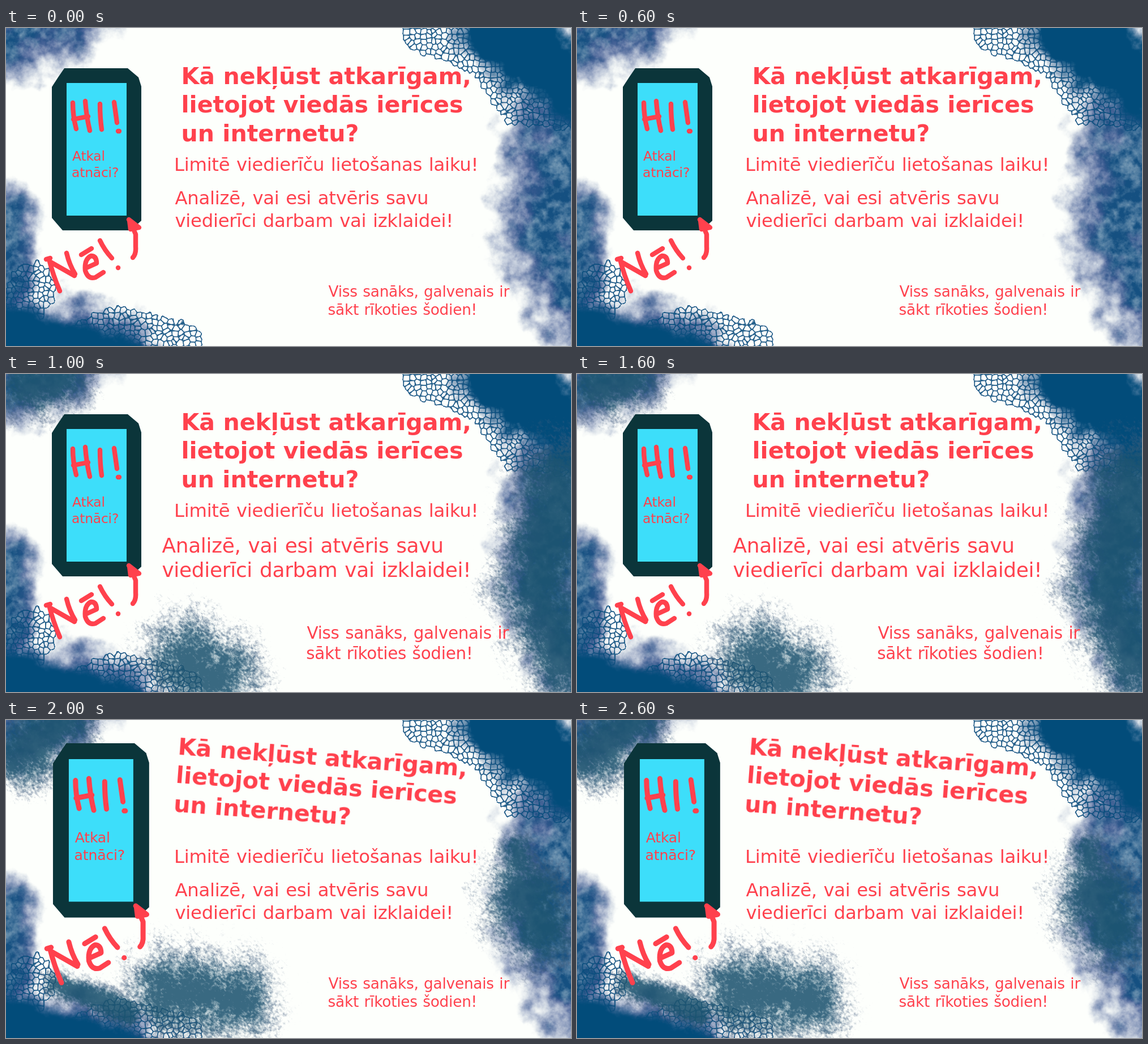
Write an HTML page with a canvas that moves like this. It is 998x561 px and loops after 3 s.

```html
<!DOCTYPE html>
<html lang="lv">
<head>
<meta charset="utf-8">
<title>Viedierīces</title>
<style>
html, body { margin: 0; width: 100%; height: 100%; overflow: hidden; background: #fdfffc; }
canvas, svg { position: absolute; left: 0; top: 0; width: 100%; height: 100%; }
text { font-family: "DejaVu Sans", sans-serif; fill: #ff414d; letter-spacing: -.008em; word-spacing: .05em; }
#title text { font-size: 41.1px; font-weight: bold; letter-spacing: 0; word-spacing: 0; }
.body { font-size: 32.3px; }
.note { font-size: 26.3px; }
.small { font-size: 23.4px; }
.pen { fill: none; stroke: #ff414d; stroke-width: 8.4; stroke-linecap: round; stroke-linejoin: round; }
#second, #third, #title, #phone, #advice, #closing { animation: 3s step-end infinite; }
#second { animation-name: second; }
#third { animation-name: third; }
#title { animation-name: tilt; }
#phone { animation-name: grow; }
#advice { animation-name: advice; }
#closing { animation-name: closing; }
@keyframes second { 0%, 66.6667% { visibility: hidden; } 33.3333% { visibility: visible; } }
@keyframes third { 0% { visibility: hidden; } 66.6667% { visibility: visible; } }
@keyframes tilt {
  0% { transform: none; }
  66.6667% { transform: translate(305.5px, 60.5px) rotate(4.3deg) translate(-312px, -98.5px); }
}
@keyframes grow {
  0% { transform: none; }
  66.6667% { transform: translate(-4.1px, -35.3px) scale(1.075); }
}
@keyframes advice {
  0%, 66.6667% { transform: none; }
  33.3333% { transform: translate(-56.2px, -31px) scale(1.111); }
}
@keyframes closing {
  0%, 66.6667% { transform: none; }
  33.3333% { transform: translate(-104.7px, -61.9px) scale(1.117); }
}
</style>
</head>
<body>
<canvas id="first" width="998" height="561"></canvas>
<canvas id="second" width="998" height="561"></canvas>
<canvas id="third" width="998" height="561"></canvas>
<svg viewBox="0 0 998 561">
  <g id="phone">
    <path fill="#0b353a" d="M103 71H215L234 87L239 103V340L220 357H100L81 335V104L92 87Z"/>
    <path fill="#3ddefa" d="M107 97H213V331H107Z"/>
    <path class="pen" d="M118 132Q118 155 124 178M140 129Q142 156 148 181M119 161L145 156M166 134Q166 158 169 179M191 131L196 167M198 182h2"/>
    <text class="small" x="117" y="234">Atkal</text>
    <text class="small" x="116" y="263">atnāci?</text>
    <path class="pen" d="M71 408L78 406M76 408Q83 436 95 464M77 412L121 437M107 397Q112 418 122 434
      M133 400L151 389M140 424L160 415Q160 402 150 402Q138 408 140 428Q145 444 158 440L172 431
      M166 375Q174 392 187 406M198 423h.1M224 405Q230 399 229 386V364L219 340M217 338L235 352L220 355L218 339"/>
  </g>
  <g id="title">
    <text x="309.5" y="98.5">Kā nekļūst atkarīgam,</text>
    <text x="309.5" y="149.3">lietojot viedās ierīces</text>
    <text x="309.5" y="200">un internetu?</text>
  </g>
  <text class="body" x="297" y="251.5">Limitē viedierīču lietošanas laiku!</text>
  <g id="advice" class="body">
    <text x="298.5" y="311">Analizē, vai esi atvēris savu</text>
    <text x="298.5" y="350.5">viedierīci darbam vai izklaidei!</text>
  </g>
  <g id="closing" class="note">
    <text x="569.5" y="473.5">Viss sanāks, galvenais ir</text>
    <text x="568.5" y="505.5">sākt rīkoties šodien!</text>
  </g>
</svg>
<script>
const W = 998, H = 561;

const mix = (a, b, t) => a + (b - a) * t;
const clamp = t => Math.min(1, Math.max(0, t));

function smooth(lo, hi, v) {
  const t = clamp((v - lo) / (hi - lo));
  return t * t * (3 - 2 * t);
}

function hash(x, y) {
  let h = Math.imul(x, 374761393) ^ Math.imul(y, 668265263);
  h = Math.imul(h ^ h >>> 13, 1274126177);
  return ((h ^ h >>> 16) >>> 0) / 2 ** 32;
}

function noise(x, y) {
  const i = Math.floor(x), j = Math.floor(y);
  const u = smooth(0, 1, x - i), v = smooth(0, 1, y - j);
  return mix(mix(hash(i, j), hash(i + 1, j), u), mix(hash(i, j + 1), hash(i + 1, j + 1), u), v);
}

function fbm(x, y, octaves) {
  let sum = 0, amp = 1, total = 0;
  for (let k = 0; k < octaves; k++) {
    sum += amp * noise(x, y);
    total += amp;
    amp *= .55;
    [x, y] = [1.6 * x - 1.2 * y + 17, 1.2 * x + 1.6 * y + 31];
  }
  return sum / total;
}

// Brush stroke through key points: 1 on the line, 0 at the given radius, negative beyond
function brush(radius, ...pts) {
  return (x, y) => {
    let least = Infinity;
    for (let k = 1; k < pts.length; k++) {
      const [ax, ay] = pts[k - 1], dx = pts[k][0] - ax, dy = pts[k][1] - ay;
      const t = clamp(((x - ax) * dx + (y - ay) * dy) / (dx * dx + dy * dy));
      least = Math.min(least, Math.hypot(x - ax - t * dx, y - ay - t * dy));
    }
    return 1 - least / radius;
  };
}

const union = (...fields) => (x, y) => fields.reduce((top, f) => Math.max(top, f(x, y)), -9);

const clouds = union(
  brush(95, [0, 15], [110, -25]),
  brush(120, [985, 170], [960, 370], [1020, 470]),
  brush(65, [0, 330], [5, 470]),
  brush(100, [10, 535], [190, 575])
);
const deeps = union(
  brush(88, [860, -10], [990, 90]),
  brush(85, [0, 545], [190, 600])
);
const foams = union(
  brush(38, [735, 8], [800, 32], [860, 60], [905, 135], [998, 145]),
  brush(45, [45, 455], [20, 510]),
  brush(38, [120, 555], [200, 527], [310, 557])
);
const splatsA = union(
  brush(80, [40, 20], [90, 10]),
  brush(110, [975, 190], [935, 385], [1000, 520]),
  brush(115, [325, 505], [370, 530])
);
const splatsB = union(
  brush(88, [95, 0], [30, 60]),
  brush(105, [910, 310], [945, 370]),
  brush(50, [900, 230], [905, 250]),
  brush(110, [290, 480], [405, 490]),
  brush(40, [90, 465], [215, 515])
);

// Outlines of irregular cells lying inside the foam strokes
function foam(x, y) {
  const size = 9.5, ci = Math.floor(x / size), cj = Math.floor(y / size);
  let a = { d: Infinity }, b = a;
  for (let j = cj - 1; j <= cj + 1; j++) for (let i = ci - 1; i <= ci + 1; i++) {
    const px = (i + .1 + .8 * hash(i, j)) * size, py = (j + .1 + .8 * hash(i + 91, j + 57)) * size;
    const p = { px, py, d: Math.hypot(x - px, y - py) };
    if (p.d < a.d) { b = a; a = p; } else if (p.d < b.d) b = p;
  }
  const edge = 1 - smooth(.6, 2.8, b.d - a.d);
  return edge && Math.max(foams(a.px, a.py), foams(b.px, b.py)) > .1 ? edge * .9 : 0;
}

function makeLayer(id, shade) {
  const ctx = document.getElementById(id).getContext("2d");
  const img = ctx.createImageData(W, H);
  for (let y = 0, k = 0; y < H; y++) for (let x = 0; x < W; x++, k += 4) {
    const c = shade(x, y);
    if (c) img.data.set(c, k);
  }
  ctx.putImageData(img, 0, 0);
}

const blend = (p, q, t, alpha) => [...p.map((v, i) => mix(v, q[i], t)), 255 * alpha];

function cloudShade(x, y) {
  const dc = clouds(x, y), dd = deeps(x, y), df = foams(x, y);
  if (Math.max(dc, dd, df) < -.5) return;
  const n = fbm(x / 34, y / 34, 5) - .5, wisp = fbm(x / 13 + 60, y / 13, 4);
  const haze = smooth(-.02, .6, dc + n * .8) * Math.min(1, .5 + .75 * wisp);
  const deep = smooth(.02, .45, dd + n * .6);
  const line = df > -.5 ? foam(x, y) : 0;
  const alpha = 1 - (1 - haze) * (1 - deep) * (1 - line);
  return blend([66, 90, 146], [2, 76, 122], Math.max(deep, line, smooth(.3, .9, dc + n) * .7), alpha);
}

function splatShade(field) {
  return (x, y) => {
    const d = field(x, y);
    if (d < -.5) return;
    const n = fbm(x / 30 + 9, y / 30, 3) - .5;
    const grain = fbm((x + y) / 6, (y - x) / 4.5, 3) - .5;
    const v = d + n * .5 + grain * .75;
    return blend([76, 98, 132], [30, 84, 112], smooth(.15, .7, d + n * .3), smooth(.08, .85, v) * .88);
  };
}

makeLayer("first", cloudShade);
makeLayer("second", splatShade(splatsA));
makeLayer("third", splatShade(splatsB));
</script>
</body>
</html>
```
